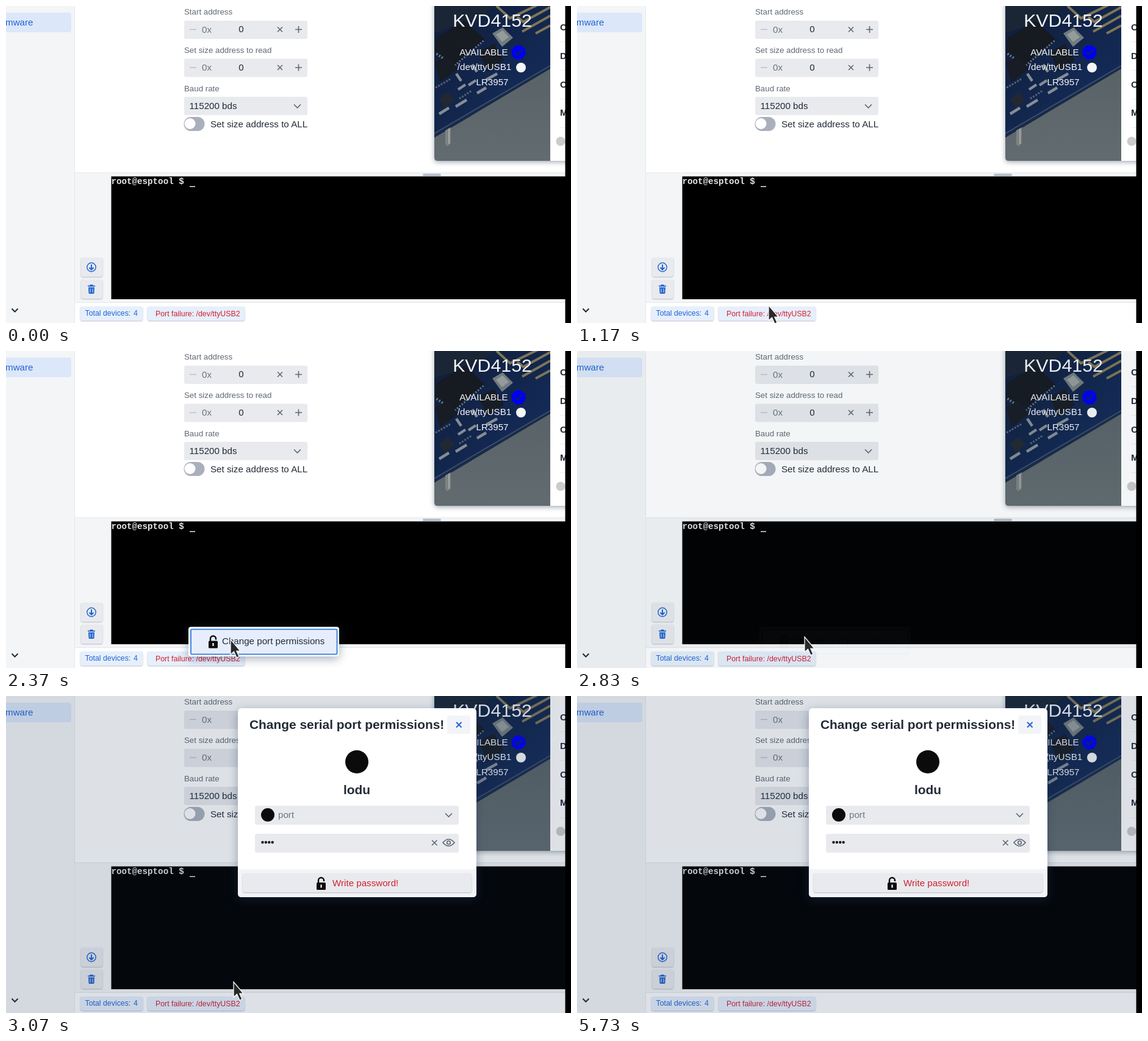
Animation of 926 by 520 pixels, one loop 5.9 s. Source, as an HTML page:

```html
<!DOCTYPE html>
<html lang="en">
<head>
<meta charset="utf-8">
<title>Change serial port permissions</title>
<style>
html, body { margin: 0; width: 100%; height: 100%; overflow: hidden; background: #fff; }
svg { display: block; width: 926px; height: 520px; font: 15.15px "Liberation Sans", Arial, sans-serif; fill: #222b37; }
.label { font-size: 13.3px; fill: #606975; }
.soft { fill: #6d7682; }
.field { fill: #e8eaee; }
.blue { fill: #2264d1; }
.red { fill: #d3202f; }
.bold { font-weight: bold; }
.title { font-size: 20.9px; font-weight: bold; }
.small { font-size: 12.35px; }
.mid { text-anchor: middle; }
.term { font: bold 14.2px "Liberation Mono", "DejaVu Sans Mono", monospace; fill: #e6e6e6; }
.line { fill: none; stroke: #5d6672; stroke-width: 1.6; }
.lift { filter: drop-shadow(0 1px 1px #8993a399); }
.card { filter: drop-shadow(0 2px 4px #33445577); }
.pop { filter: drop-shadow(0 4px 8px #22385a66); }
</style>
</head>
<body>
<svg viewBox="0 0 926 520">
  <defs>
    <clipPath id="photo"><path d="M702 0H892V254H707Q702 254 702 249Z"/></clipPath>
    <linearGradient id="floor" x2="0" y2="1"><stop stop-color="#535d61"/><stop offset="1" stop-color="#626c70"/></linearGradient>
    <linearGradient id="pcb" x2="1" y2="1"><stop stop-color="#101d38"/><stop offset="1" stop-color="#152f62"/></linearGradient>
    <g id="lock">
      <rect y="9" width="15" height="12" rx="1.5" fill="#0b0b0b"/>
      <path d="M3 10V5.5a4.5 4.5 0 0 1 9 0V7" fill="none" stroke="#0b0b0b" stroke-width="2.4"/>
      <path d="M7.5 12.5v5" stroke="#fff" stroke-width="2.2"/>
    </g>
    <g id="stepper">
      <rect class="field" x="292" y="24" width="202" height="30" rx="3"/>
      <path d="M301 38.500h11" stroke="#b6bcc5" stroke-width="1.300"/>
      <text class="soft" x="321" y="43.500">0x</text>
      <text class="mid" x="385.500" y="43">0</text>
      <path class="line" d="M445 34.500l8 8m0-8l-8 8M474 38.500h11m-5.500-5.500v11"/>
    </g>
    <path id="down" class="line" d="M0 0l5.500 5.500l5.500-5.500"/>
  </defs>

  <!-- Sidebar and form -->
  <rect width="926" height="520" fill="#fff"/>
  <rect width="113" height="520" fill="#f3f5f7"/>
  <path d="M112.500 0V520" stroke="#e6e9ed"/>
  <rect x="-6" y="11" width="113" height="32" rx="4" fill="#dce7fa"/>
  <text class="blue" x="44.500" y="32" text-anchor="end">Firmware</text>
  <path d="M9.500 496.500l5 5l5-5" fill="none" stroke="#222b37" stroke-width="2"/>

  <text class="label" x="292" y="14">Start address</text>
  <use href="#stepper"/>
  <text class="label" x="292" y="77">Set size address to read</text>
  <use href="#stepper" y="62.500"/>
  <text class="label" x="292" y="139.500">Baud rate</text>
  <rect class="field" x="292" y="149" width="202" height="30" rx="3"/>
  <text x="300.500" y="168.500">115200 bds</text>
  <use href="#down" x="472" y="161.500"/>
  <rect x="291.500" y="182" width="34" height="23" rx="11.500" fill="#a9b0bc"/>
  <circle cx="301.500" cy="193" r="9" fill="#fff"/>
  <text x="335" y="199">Set size address to ALL</text>

  <!-- Device card -->
  <path class="card" d="M702-9H930V254H707Q702 254 702 249Z" fill="#fff"/>
  <g clip-path="url(#photo)">
    <path d="M702 0H892V254H702Z" fill="url(#floor)"/>
    <path d="M702 0H892V103L702 216Z" fill="#1a2a47"/>
    <path d="M702 0H892V95L702 207Z" fill="url(#pcb)"/>
    <path d="M702 209L892 98" stroke="#3d5680" stroke-width="1.500"/>
    <path d="M702 0H800L772 22L702 44Z" fill="#1a2536"/>
    <path d="M804 0l22 20l50-24M838 18l10 8l44-24M846 42l46-26M868 45l24-13" fill="none" stroke="#7f7655" stroke-width="4"/>
    <path d="M735 97L782 56M706 78l26 18" stroke="#77808a" stroke-width="5" stroke-dasharray="2 3"/>
    <path d="M706 52L752 24L784 54L735 96L703 74Z" fill="#161a21"/>
    <path d="M774 75L800 62L816 88L790 108Z" fill="#181c24"/>
    <path d="M797 45L814 35L831 52L813 67Z" fill="#727b7e"/>
    <path d="M803 47L814 40L824 51L813 59Z" fill="#949b9b"/>
    <path d="M703 92L724 82L741 103L712 125Z" fill="#171c25"/>
    <path d="M710 152L724 141L735 153L719 168Z" fill="#222831"/>
    <path d="M738 111l8 12M764 96l8 12M741 137l12-8M758 130l12-8M710 177l16-10M737 165l18-11M772 143l15-9M787 121l18-10" stroke="#858d94" stroke-width="4.500"/>
    <path d="M704 134l24-14M743 152l20-13" stroke="#566372" stroke-width="3" stroke-dasharray="3 2"/>
    <path d="M720 204l9-5v26l-5 5l-4-3Z" fill="#7d8382"/>
    <path d="M726 201v25" stroke="#a5a8a4" stroke-width="2"/>
  </g>
  <g fill="#f4f6f8" class="mid">
    <text x="797" y="33.500" style="font-size:30.300px">KVD4152</text>
    <text x="783" y="81">AVAILABLE</text>
    <text x="784" y="105">/dev/ttyUSB1</text>
    <text x="797" y="130">LR3957</text>
  </g>
  <circle cx="840" cy="76" r="11" fill="#0000f2"/>
  <circle cx="840" cy="76" r="11" fill="none" stroke="#0000f2" stroke-width="2" stroke-dasharray="5.600 3"/>
  <path d="M834.500 76l4 4l7-8" fill="none" stroke="#10254f" stroke-width="2"/>
  <circle cx="844" cy="101" r="8" fill="#f4f6f8"/>
  <g class="bold">
    <text x="908" y="40">C</text><text x="908" y="87">D</text>
    <text x="908" y="134">C</text><text x="908" y="180">M</text>
  </g>
  <path d="M908 58.500h9M908 105.500h9M908 152.500h9M908 199.500h9" stroke="#eceef1"/>
  <circle cx="909" cy="222" r="7.500" fill="#cbcbcb"/>

  <!-- Terminal and status bar -->
  <rect x="113" y="274" width="804" height="212" fill="#f3f5f7"/>
  <path d="M113 273.500H917M113 486.500H917" stroke="#e3e6ea"/>
  <rect x="683" y="275" width="30" height="4" rx="2" fill="#b8c0cc"/>
  <rect x="172.500" y="279.500" width="744.500" height="201.500" fill="#000"/>
  <text class="term" x="172.500" y="292">root@esptool $</text>
  <rect x="301" y="295.500" width="9" height="1.500" fill="#e6e6e6"/>
  <g class="lift field">
    <rect x="123" y="413" width="35" height="31" rx="3"/>
    <rect x="123" y="449" width="35" height="31" rx="3"/>
  </g>
  <circle cx="140" cy="428.500" r="7.200" fill="none" stroke="#2264d1" stroke-width="1.400"/>
  <path d="M140 424v8.500m-3.500-3.500l3.500 3.500l3.500-3.500" fill="none" stroke="#2264d1" stroke-width="2"/>
  <path class="blue" d="M134 458.500h3.500v-1.500h5v1.500h3.500v1.800h-12ZM135 461.500h10l-.5 9q0 1.500-1.500 1.500h-6q-1.500 0-1.500-1.500Z"/>
  <path d="M138 463.500v6.500m4-6.500v6.500" stroke="#e8eaee"/>
  <g class="lift" fill="#e6effc">
    <rect x="122" y="493" width="102" height="23" rx="3"/>
    <rect x="232" y="493" width="159" height="23" rx="3"/>
  </g>
  <text class="small blue" x="129.500" y="508">Total devices: <tspan x="209">4</tspan></text>
  <text class="small red" x="245" y="508.500">Port failure: /dev/ttyUSB2</text>

  <g id="menu">
    <rect class="pop" x="299" y="452.500" width="247" height="48.500" rx="4" fill="#fff"/>
    <rect x="303" y="456.500" width="239.500" height="41" rx="2" fill="#e6eefb" stroke="#4288df" stroke-width="2"/>
    <use href="#lock" x="332" y="466.500"/>
    <text x="354" y="481">Change port permissions</text>
  </g>

  <rect id="shade" width="917" height="520" fill="#1b3758"/>

  <g id="dialog">
    <rect class="pop" x="380" y="20" width="391" height="310" rx="6" fill="#fff"/>
    <path d="M380 284H771V324Q771 330 765 330H386Q380 330 380 324Z" fill="#f3f4f7"/>
    <text class="title" x="399" y="54">Change serial port permissions!</text>
    <rect x="723" y="32" width="38" height="30" rx="3" fill="#f2f4f7"/>
    <path d="M738 43l8.500 8.500m0-8.500l-8.500 8.500" stroke="#2264d1" stroke-width="2"/>
    <circle cx="575" cy="108" r="19" fill="#0b0b0b"/>
    <text class="title mid" x="575" y="161">lodu</text>
    <g class="field">
      <rect x="408" y="180" width="334" height="31" rx="3"/>
      <rect x="408" y="226" width="334" height="31" rx="3"/>
    </g>
    <circle cx="429" cy="195" r="11" fill="#0b0b0b"/>
    <text class="soft" x="446" y="199.500">port</text>
    <use href="#down" x="720" y="192.500"/>
    <path d="M420.500 240h18" stroke="#111820" stroke-width="4.400" stroke-linecap="round" stroke-dasharray="0 5.400"/>
    <path class="line" d="M698 236.500l8.500 8.500m0-8.500l-8.500 8.500M716 240.500q9.500-11 19 0q-9.500 11-19 0Z"/>
    <circle class="line" cx="725.500" cy="240.500" r="2.800"/>
    <rect class="lift field" x="388" y="291" width="375" height="31" rx="3"/>
    <use href="#lock" x="509" y="297"/>
    <text class="red" x="535" y="311.500">Write password!</text>
  </g>

  <path id="cursor" d="M0 0V25L5.500 20L10 30L14 28.200L9.800 19H16Z" fill="#292929" stroke="#fff" stroke-width="1.200"/>
  <rect x="916.500" width="9.500" height="520" fill="#000"/>
</svg>
<script>
const LOOP = 5900;
const [menu, shade, dialog, cursor] =
  ["menu", "shade", "dialog", "cursor"].map(id => document.getElementById(id));

// time, x, y of the pointer tip
const route = [[530, 372, 524], [1100, 314, 491], [1400, 314, 491], [1630, 300, 501],
  [2130, 300, 501], [2370, 368, 473], [2470, 373, 469]];

const ramp = (t, a, b) => Math.min(1, Math.max(0, (t - a) / (b - a)));
const ease = p => p * p * (3 - 2 * p);

function tip(t) {
  let [, x, y] = route[0];
  for (let i = 1; i < route.length; i++) {
    const [t0, x0, y0] = route[i - 1], [t1, x1, y1] = route[i];
    const p = ease(ramp(t, t0, t1));
    x += (x1 - x0) * p;
    y += (y1 - y0) * p;
  }
  return `translate(${x} ${y})`;
}

function draw(now) {
  const t = now % LOOP;
  menu.style.opacity = ramp(t, 1770, 1950) * (1 - ramp(t, 2640, 2835));
  shade.style.opacity = .15 * ramp(t, 2780, 2930);

  const open = ease(ramp(t, 2840, 3020)), size = .95 + .05 * open;
  dialog.style.opacity = open;
  dialog.setAttribute("transform", `translate(575.5 175) scale(${size}) translate(-575.5 -175)`);

  cursor.style.opacity = t < 530 ? 0 : 1 - ramp(t, 3830, 4120);
  cursor.setAttribute("transform", tip(t));
  requestAnimationFrame(draw);
}
requestAnimationFrame(draw);
</script>
</body>
</html>
```
